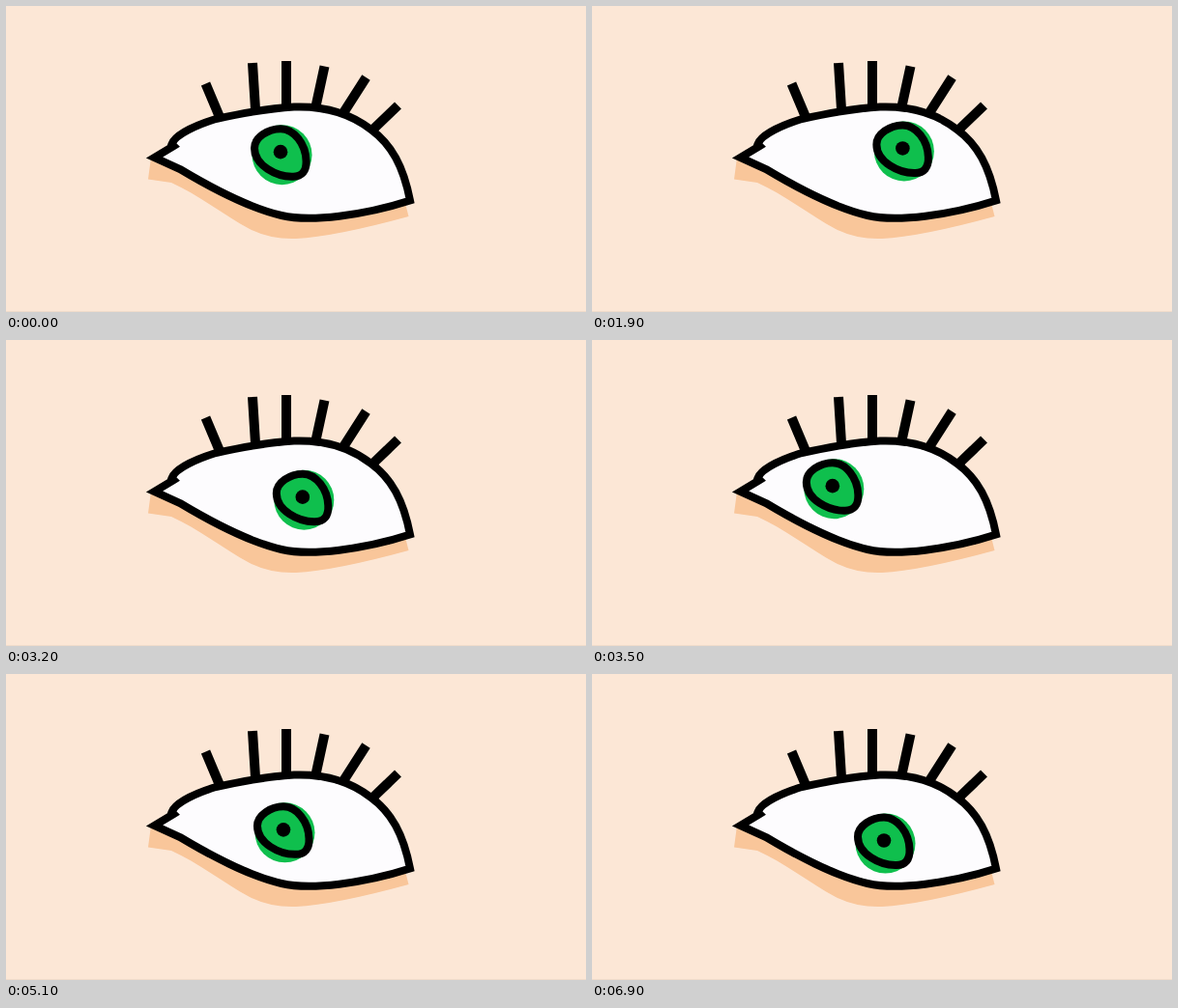
Write an HTML page that moves like this. It is 600x317 px and loops after 7.3 s.

```html
<!DOCTYPE html>
<html lang="en">
<head>
<meta charset="utf-8">
<title>Looking eye</title>
<style>
  html, body { margin: 0; width: 100%; height: 100%; overflow: hidden; background: #fce7d6; }
  svg { display: block; width: 100%; height: 100%; }
  .line { fill: none; stroke: #000; stroke-width: 8; stroke-miterlimit: 3; }
  .lash { stroke-width: 10; }
</style>
</head>
<body>
<svg viewBox="0 0 600 317">
  <defs>
    <path id="eye" d="M173.500 145 L153.500 157 L180 169 C215 190 255 210 285 217
      C315 224 370 217 418 201.500 C411 166 399 143.500 377 127.500
      C353 109 326 103.500 298 104.500 C272 106 240 112 217 117
      C198 123 175 133 171.500 143 Z"/>
  </defs>

  <rect y="316" width="600" height="1" fill="#f0dccb"/>
  <path fill="#f9c69a" d="M150 157 L147 179.500 L171 183 C198 195 226 217 252 231
    Q274 242 300 241 Q340 239 416.500 218 L412 200 L222 180 Z"/>
  <use href="#eye" fill="#fdfcfe"/>

  <g id="iris">
    <circle cx="1.500" cy="3" r="31" fill="#0fbf4d"/>
    <path class="line" d="M0 -24 C14 -24 26 -8 26.500 9 C27 20 22 25.500 13 25.500
      C-4 26 -27 14 -27 -4 C-27 -15 -13 -24 0 -24 Z"/>
    <circle r="7.300"/>
  </g>

  <use href="#eye" class="line"/>
  <path class="line lash" d="M206.500 80.500 L221 115 M255 59 L258 107 M290 57 V104
    M329.500 62.500 L320.500 104 M372.500 74 L349.500 110 M405.500 103 L378.500 129"/>
</svg>
<script>
  const LOOP = 7300, CYCLE = 6400, LEAD = 90, STEP = 100;
  const iris = document.getElementById('iris');

  // Steady glances from point to point; the last one leads back to the first
  const glances = [
    { x: 302, y: 172.5, at: 0, ms: 550 },
    { x: 321, y: 147.2, at: 740, ms: 600 },
    { x: 359, y: 173, at: 1985, ms: 500 },
    { x: 243, y: 150, at: 3020, ms: 600 },
    { x: 287.5, y: 162.5, at: 3840, ms: 600 },
    { x: 280.5, y: 147, at: 5140, ms: 670 }
  ];

  function gazeAt(t) {
    let { x, y } = glances[glances.length - 1];
    for (const g of glances) {
      const k = Math.min(1, Math.max(0, (t - g.at) / g.ms));
      x += (g.x - x) * k;
      y += (g.y - y) * k;
    }
    return { x, y };
  }

  const start = performance.now();
  function draw() {
    const t = (performance.now() - start) % LOOP;
    const held = Math.floor(t / STEP) * STEP;
    const { x, y } = gazeAt((held + LEAD) % CYCLE);
    iris.setAttribute('transform', `translate(${x.toFixed(2)} ${y.toFixed(2)})`);
    requestAnimationFrame(draw);
  }
  draw();
</script>
</body>
</html>
```
